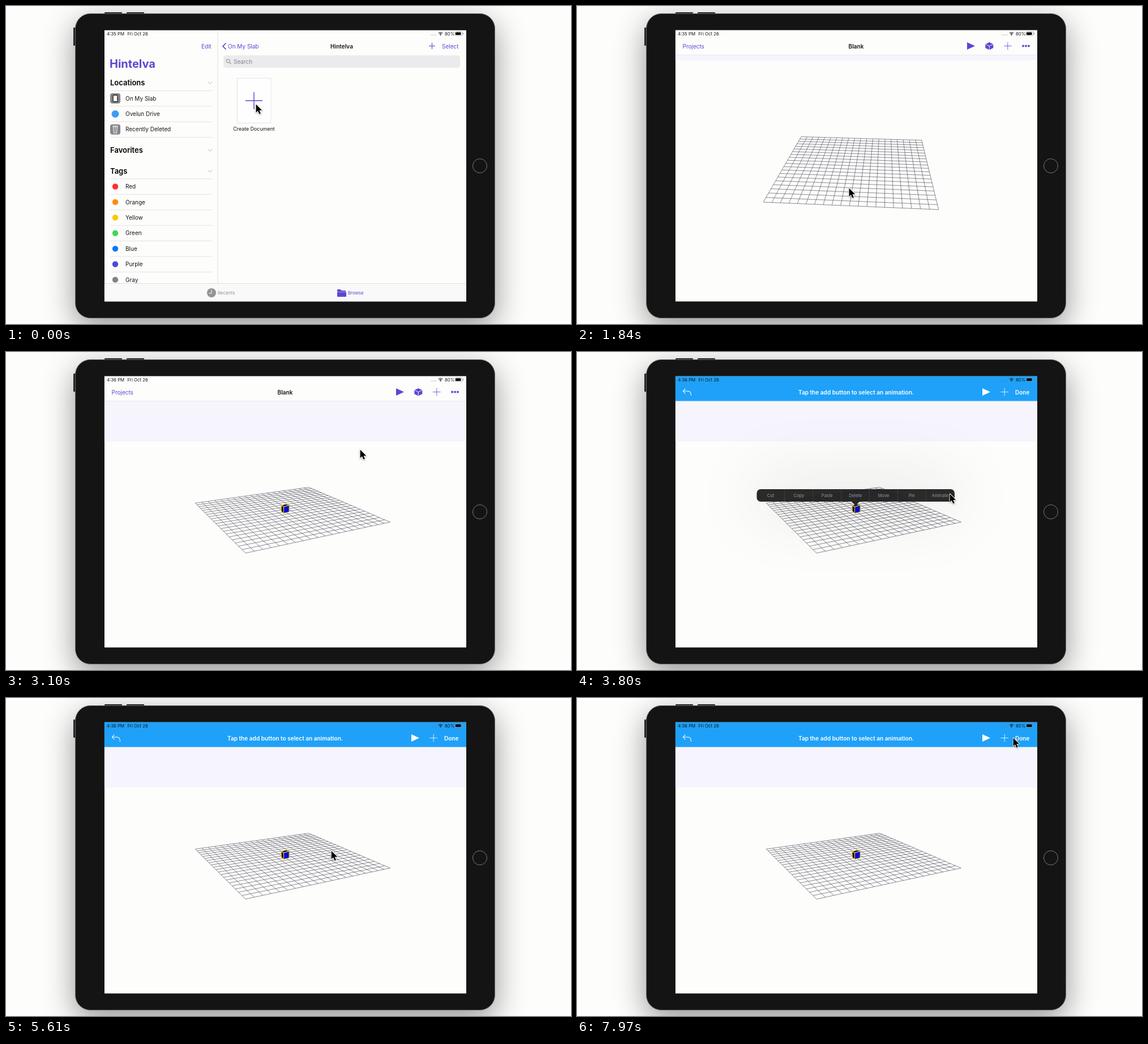
An HTML page with a canvas for the animation above (8000 ms loop, 998x561 px).

```html
<!DOCTYPE html>
<html lang="en">
<head>
<meta charset="utf-8">
<title>Tablet scene editor</title>
<style>
html, body { margin: 0; width: 100%; height: 100%; overflow: hidden; background: #fdfdfc; }
div { position: absolute; background: #2b2b2d; }
.tablet { left: 122px; top: 13px; width: 740px; height: 536px; border: 1px solid #6a686d; border-radius: 27px;
  background: #141414; box-shadow: 0 17px 54px rgba(0,0,0,.42); }
.key { top: 10.5px; width: 31px; height: 4px; border-radius: 1px 1px 0 0; }
.side { left: 118.5px; top: 38px; width: 5px; height: 32px; border-radius: 1px 0 0 1px; }
.home { left: 824px; top: 269px; width: 24px; height: 24px; border: 1px solid #77777a; border-radius: 50%; background: none; }
canvas { position: absolute; left: 0; top: 0; width: 998px; height: 561px; }
</style>
</head>
<body>
<div class="key" style="left:174px"></div>
<div class="key" style="left:213px"></div>
<div class="side"></div>
<div class="tablet"></div>
<div class="home"></div>
<canvas id="stage"></canvas>
<script>
const LOOP = 8000;
const PURPLE = '#5b47d2', BLUE = '#1fa1f9', ORANGE = '#fc8520', INK = '#161617', PAPER = '#fdfdfc';
const SCREEN = [173.7, 42.5, 639.3, 479];
const canvas = document.getElementById('stage');
const c = canvas.getContext('2d');
const dpr = window.devicePixelRatio || 1;
canvas.width = 998 * dpr;
canvas.height = 561 * dpr;

// time, x, y of the pointer tip
const pointerKeys = [
  [0, 441, 173], [450, 441, 173], [1200, 446, 200], [1650, 468, 330], [1840, 480, 321],
  [2300, 669, 295], [2430, 690, 291], [2820, 760, 68], [2960, 760, 68], [3240, 493, 274],
  [3380, 493, 274], [3720, 657, 250], [3800, 658, 250], [4060, 755, 69], [4180, 755, 69],
  [4500, 645, 128], [4760, 645, 128], [5150, 560, 285], [5550, 560, 285], [5920, 755, 69],
  [6060, 755, 69], [6400, 626, 136], [6640, 626, 136], [7020, 440, 300], [7300, 440, 300],
  [7850, 770, 70], [8000, 770, 70]
];
// time, yaw in degrees, sine of the camera pitch
const cameraKeys = [
  [0, 5.5, .47], [1650, 5.5, .47], [1840, 4.4, .455], [2300, -10.3, .321],
  [2480, -19, .318], [2680, -26, .318], [2850, -28, .318], [8000, -28, .318]
];
// start time and name of each header
const modes = [[0, 'doc'], [3740, 'animate'], [4690, 'pick'], [5560, 'animate'], [6650, 'pick'], [7300, 'animate']];

const clamp = v => Math.max(0, Math.min(1, v));
const smooth = v => v * v * (3 - 2 * v);
const ramp = (t, from, to) => clamp((t - from) / (to - from));
const pulse = (t, a, b, d, e) => ramp(t, a, b) * (1 - ramp(t, d, e));

function sample(keys, t, ease = v => v) {
  let i = 0;
  while (i < keys.length - 2 && t >= keys[i + 1][0]) i++;
  const a = keys[i], b = keys[i + 1], k = ease(ramp(t, a[0], b[0]));
  return [a[1] + (b[1] - a[1]) * k, a[2] + (b[2] - a[2]) * k];
}

function text(s, x, y, size = 10, color = INK, weight = 400, align = 'left') {
  c.font = `${weight} ${size}px Inter, Roboto, sans-serif`;
  c.textAlign = align;
  c.fillStyle = color;
  c.fillText(s, x, y + size * .36);
}
function rect(x, y, w, h, color, r = 0) {
  c.fillStyle = color;
  c.beginPath();
  c.roundRect(x, y, w, h, r);
  c.fill();
}
function trace(points, close) {
  c.beginPath();
  points.forEach(p => c.lineTo(p[0], p[1]));
  if (close) c.closePath();
}
function poly(points, color) { trace(points, true); c.fillStyle = color; c.fill(); }
function line(points, color, width = 1, close) {
  trace(points, close);
  c.strokeStyle = color;
  c.lineWidth = width;
  c.stroke();
}
function dot(x, y, r, color) {
  c.fillStyle = color;
  c.beginPath();
  c.arc(x, y, r, 0, 7);
  c.fill();
}
function plus(x, y, r, color, width) {
  line([[x - r, y], [x + r, y]], color, width);
  line([[x, y - r], [x, y + r]], color, width);
}
const chevronLeft = (x, y, h) => line([[x + h, y - h], [x, y], [x + h, y + h]], PURPLE, 1.7);
const play = (x, color) => poly([[x, 64], [x + 14, 70.5], [x, 77]], color);
function faded(alpha, draw) {
  if (alpha <= 0) return;
  c.save();
  c.globalAlpha *= alpha;
  draw();
  c.restore();
}
function shadow(blur, alpha) {
  c.shadowBlur = blur * dpr;
  c.shadowColor = `rgba(0,0,0,${alpha})`;
}

function statusBar(t) {
  text(t < 2050 ? '4:35 PM' : '4:36 PM', 178, 49, 7.8);
  text('Fri Oct 26', 214.5, 49, 7.8);
  for (let i = 0; i < 4; i++) dot(751 + i * 2.8, 51, .6, '#666');
  c.strokeStyle = INK;
  c.lineWidth = 1.2;
  for (const r of [2.7, 5]) {
    c.beginPath();
    c.arc(767.5, 51.5, r, -2.35, -.79);
    c.stroke();
  }
  dot(767.5, 51, .9, INK);
  text('80%', 775, 49, 7.8);
  c.strokeStyle = '#888';
  c.lineWidth = .7;
  c.beginPath();
  c.roundRect(793, 45.5, 13, 6.5, 1.6);
  c.stroke();
  rect(794, 46.5, 9.5, 4.5, '#000', 1);
  rect(807, 47.5, 1, 2.5, '#888');
}

function browser(t) {
  const rule = y => line([[184, y], [364, y]], '#dcdcde', .8);
  const heading = (s, y) => {
    text(s, 184, y, 13, '#000', 600);
    line([[356.5, y - 1.5], [360.5, y + 2], [364.5, y - 1.5]], '#bbbbc0', 1);
  };
  rect(...SCREEN, PAPER);
  line([[374, 42], [374, 489]], '#dedee2', 1);
  text('Edit', 345, 71, 10, PURPLE);
  text('Hintelva', 183, 101.5, 20, PURPLE, 700);

  heading('Locations', 135);
  ['On My Slab', 'Ovelun Drive', 'Recently Deleted'].forEach((name, i) => {
    const y = 163 + i * 27.4;
    rule(y - 13.6);
    if (i === 1) dot(193, y, 6.5, '#3d9df3');
    else rect(184, y - 9, 18, 18, '#85858a', 4);
    text(name, 211, y);
  });
  rule(231.7);
  rect(188.5, 156.5, 9, 13, '#222', 1.5);
  rect(189.8, 158, 6.4, 10, '#fff');
  line([[189.5, 213], [190.5, 224], [195.5, 224], [196.5, 213]], '#fff', 1, true);
  line([[188, 212], [198, 212]], '#fff', 1);
  line([[193, 214], [193, 222]], '#fff', .8);

  heading('Favorites', 254);
  heading('Tags', 291);
  c.save();
  c.beginPath();
  c.rect(174, 42, 200, 447);
  c.clip();
  [['Red', '#fc3130'], ['Orange', '#fd8c0c'], ['Yellow', '#fdc608'], ['Green', '#3fd75b'],
   ['Blue', '#0a76fb'], ['Purple', '#5149d2'], ['Gray', '#838387']].forEach(([name, color], i) => {
    const y = 318.5 + i * 27.4;
    rule(y - 13.6);
    dot(193, y, 5.2, color);
    text(name, 211, y);
  });
  c.restore();

  chevronLeft(383, 71, 5.5);
  text('On My Slab', 392, 71, 10, PURPLE);
  text('Hintelva', 593, 71, 10, INK, 600, 'center');
  plus(752.5, 70.5, 5.5, PURPLE, 1.1);
  text('Select', 770, 71, 10, PURPLE);
  rect(384, 87, 418, 22, '#ebebed', 5);
  c.strokeStyle = '#828287';
  c.lineWidth = 1;
  c.beginPath();
  c.arc(392.3, 97, 3.1, 0, 7);
  c.stroke();
  line([[394.6, 99.4], [397.5, 102.3]], '#828287', 1.1);
  text('Search', 402, 98, 10, '#85858a');

  rect(408, 127, 60, 79.5, '#fefefe');
  c.strokeStyle = '#dedee0';
  c.lineWidth = .8;
  c.strokeRect(408.4, 127.4, 59.5, 79);
  plus(438, 167, 15, PURPLE, 1.4);
  text('Create Document', 438, 216.5, 8.9, INK, 400, 'center');

  rect(173.7, 489, 639.3, 32.5, '#f9f9fa');
  line([[174, 489.5], [813, 489.5]], '#d8d8db', .8);
  dot(363, 506, 8, '#929297');
  line([[363, 500.5], [363, 507], [358.5, 507]], '#fff', 1);
  text('Recents', 374, 506, 8, '#929297');
  poly([[585, 500], [591, 500], [592.5, 502], [600, 502], [600, 504], [585, 504]], PURPLE);
  rect(585, 504.5, 16, 8.5, PURPLE, 1);
  text('Browse', 604, 506, 7.8, PURPLE);
  statusBar(t);
}

function grid(yaw, pitch) {
  const a = yaw * Math.PI / 180, cos = Math.cos(a), sin = Math.sin(a);
  const project = (x, z) => {
    const right = x * cos - z * sin, near = x * sin + z * cos;
    const scale = 126.5 / (1 - .1867 * near);
    return [493 + right * scale, 282 + near * pitch * scale];
  };
  for (let i = -10; i <= 10; i++) {
    const k = i / 10;
    line([project(k, -1), project(k, 1)], '#4c4c58', .65);
    line([project(-1, k), project(1, k)], '#4c4c58', .65);
  }
}

function cube() {
  const back = [493.8, 268.3], left = [486, 271], right = [500.4, 270.3], front = [490.5, 273.3];
  const leftLow = [486.3, 281], frontLow = [490.5, 284.6], rightLow = [500, 282.2];
  const faces = [
    [[back, right, front, left], '#15152a'],
    [[left, front, frontLow, leftLow], '#08080c'],
    [[front, right, rightLow, frontLow], '#0909cf']
  ];
  for (const [points, color] of faces) {
    poly(points, color);
    line(points, '#e6c64c', 1.1, true);
  }
}

function contextMenu() {
  c.save();
  shadow(120, .3);
  rect(317.5, 242, 349.5, 22, '#1b1b1c', 7);
  c.restore();
  poly([[485, 264], [499, 264], [492, 271]], '#1b1b1c');
  ['Cut', 'Copy', 'Paste', 'Delete', 'Move', 'Pin', 'Animate'].forEach((name, i) => {
    const x = 342 + i * 49.9;
    text(name, x, 253, 7.6, '#a0a0a2', 400, 'center');
    if (i) line([[x - 25, 242], [x - 25, 264]], '#464648', .8);
  });
}

function popover() {
  c.save();
  shadow(125, .23);
  c.fillStyle = PAPER;
  c.beginPath();
  c.roundRect(607, 85.5, 199, 218, 7);
  c.moveTo(746, 86);
  c.quadraticCurveTo(750, 84, 753, 79);
  c.quadraticCurveTo(755, 76, 757.5, 79);
  c.quadraticCurveTo(761, 84, 765, 86);
  c.fill();
  c.restore();
  chevronLeft(613.5, 101.5, 5.7);
  ['Move', 'Rotate', 'Alert', 'Delay'].forEach((name, i) => text(name, 616, 133 + i * 31.1));
}

function header(mode) {
  if (mode === 'doc') {
    rect(173.7, 42.5, 639.3, 43.5, PAPER);
    line([[174, 86.5], [813, 86.5]], '#e6e6ea', .8);
    text('Projects', 186.5, 71, 10, PURPLE);
    text('Blank', 493, 71, 10, INK, 600, 'center');
    play(689, PURPLE);
    poly([[728.3, 64], [735.3, 67.3], [735.3, 74], [728.3, 77.5], [721.3, 74], [721.3, 67.3]], PURPLE);
    line([[721.5, 67.3], [728.3, 70.7], [735, 67.3]], PAPER, .9);
    line([[728.3, 70.7], [728.3, 77.5]], PAPER, .9);
    plus(760.8, 70.5, 6.8, PURPLE, .8);
    for (const x of [788, 793, 798]) dot(x, 70.5, 1.9, PURPLE);
    return;
  }
  const picking = mode === 'pick';
  rect(173.7, 42.5, 639.3, 44, picking ? ORANGE : BLUE);
  const title = picking ? 'Select a point on the grid.' : 'Tap the add button to select an animation.';
  text(title, 493, 71, 10.1, '#fff', 600, 'center');
  if (picking) {
    text('Cancel', 186.5, 71, 10, 'rgba(255,255,255,.82)');
    text('Done', 774, 71, 10, 'rgba(255,255,255,.75)', 500);
    return;
  }
  line([[191.5, 64.5], [187.5, 69], [191.5, 73.5]], '#fff', 1.1);
  c.beginPath();
  c.moveTo(187.5, 69);
  c.lineTo(196, 69);
  c.quadraticCurveTo(201.5, 69, 201.5, 77);
  c.stroke();
  play(716, '#fff');
  plus(755.2, 70.5, 6.8, '#fff', .8);
  text('Done', 774, 71, 10, '#fff', 600);
}

function documentView(t) {
  const [yaw, pitch] = sample(cameraKeys, t);
  rect(...SCREEN, PAPER);
  faded(ramp(t, 950, 1100), () => {
    const horizon = 158 - 453 * (pitch - .318);
    rect(173.7, 86, 639.3, Math.max(0, horizon - 86), '#f6f5fe');
    grid(yaw, pitch);
  });
  if (t >= 2940) cube();
  header(modes.filter(m => t >= m[0]).pop()[1]);
  statusBar(t);
  faded(pulse(t, 3340, 3440, 3790, 3950), contextMenu);
  faded(pulse(t, 4160, 4280, 4715, 4890), popover);
  faded(pulse(t, 6040, 6160, 6660, 6840), popover);
}

function pointer(t) {
  const [x, y] = sample(pointerKeys, t, smooth);
  const shape = [[0, 0], [0, 14.5], [3.3, 11.5], [5.8, 17], [8.3, 16], [5.9, 10.7], [10.6, 10.5]];
  c.save();
  c.translate(x + .6, y + .4);
  c.lineJoin = 'round';
  c.save();
  shadow(3, .35);
  c.shadowOffsetY = dpr;
  line(shape, '#fff', 1.8, true);
  c.restore();
  poly(shape, '#000');
  c.restore();
}

function draw(t) {
  c.setTransform(dpr, 0, 0, dpr, 0, 0);
  c.clearRect(0, 0, 998, 561);
  c.save();
  c.beginPath();
  c.rect(...SCREEN);
  c.clip();
  if (t < 850) {
    browser(t);
    const k = smooth(ramp(t, 520, 800));
    const mix = (a, b) => a + (b - a) * k;
    faded(ramp(t, 520, 600), () => rect(mix(408, 174), mix(127, 42), mix(60, 639), mix(79.5, 480), PAPER));
  }
  faded(ramp(t, 760, 850), () => documentView(t));
  pointer(t);
  c.restore();
}

const start = performance.now();
function tick() {
  draw((performance.now() - start) % LOOP);
  requestAnimationFrame(tick);
}
tick();
</script>
</body>
</html>
```
